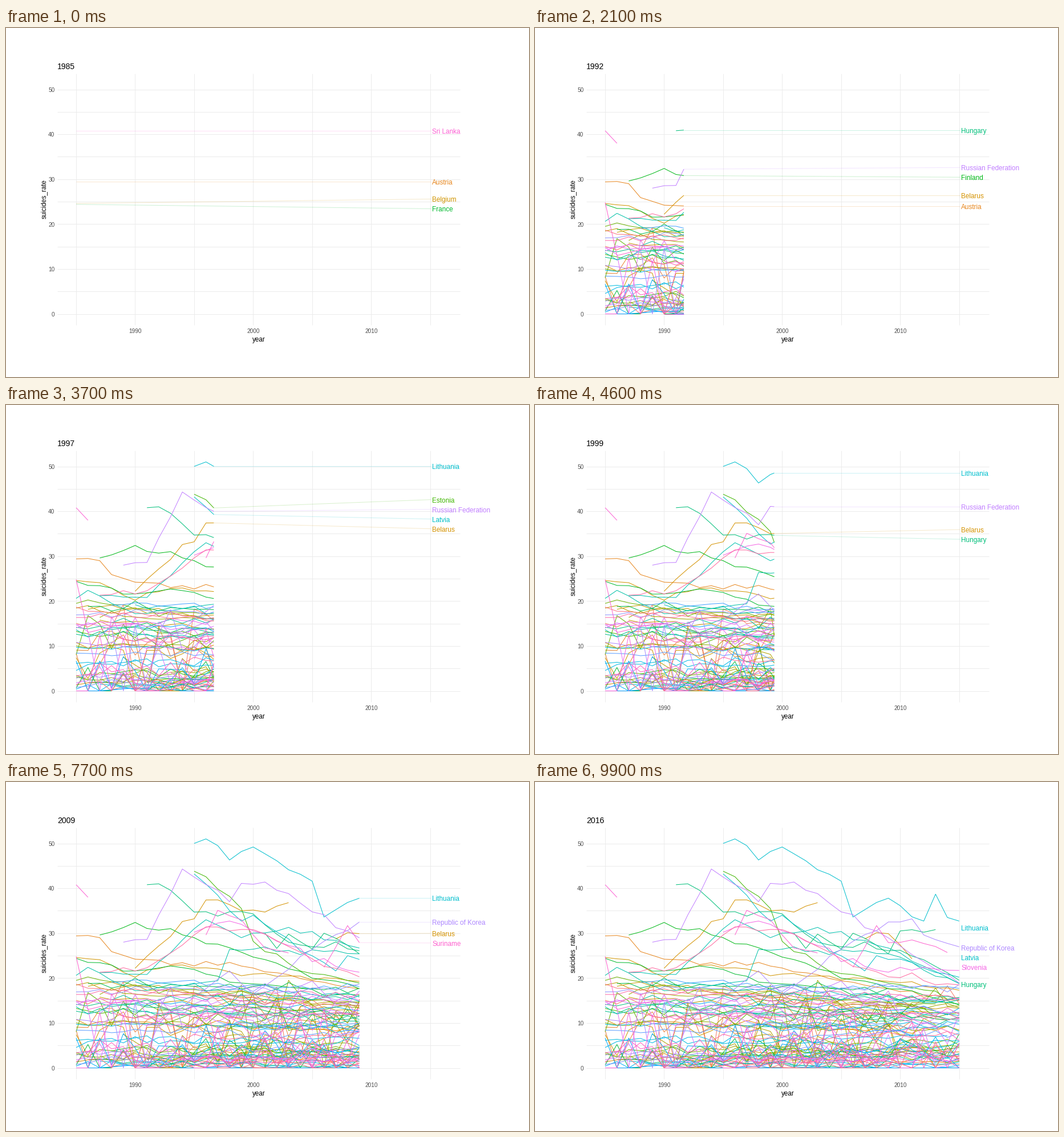
Recreate the animation shown at these times as a matplotlib script. Size 917 by 611 pixels, loop 10 s.

```python
import numpy as np
import matplotlib.pyplot as plt
from matplotlib.animation import FuncAnimation
from matplotlib.collections import LineCollection

W, H, DPI = 917, 611, 64
FRAMES, SPAN, COUNTRIES = 100, 31, 101
PT = 72 / DPI
GRID = "#ebebeb"
plt.rcParams["font.family"] = "Liberation Sans"

rng = np.random.default_rng(12)
series = []     # (hue index, first year counted from 1985, yearly rates)
names = {}      # hue index -> label


def px(year):
    return 123 + 20.69 * year


def py(rate):
    return 500.5 - 7.86 * rate


def hue_color(i):
    """Evenly spaced HCL hue with chroma 100 and luminance 65."""
    h = np.radians(15 + 360 * i / COUNTRIES)
    lum = 65
    u = 100 * np.cos(h) / (13 * lum) + 0.1978
    v = 100 * np.sin(h) / (13 * lum) + 0.4683
    y = ((lum + 16) / 116) ** 3
    x, z = 9 * y * u / (4 * v), (12 - 3 * u - 20 * v) * y / (4 * v)
    rgb = np.array([3.2406 * x - 1.5372 * y - 0.4986 * z,
                    -0.9689 * x + 1.8758 * y + 0.0415 * z,
                    0.0557 * x - 0.2040 * y + 1.0570 * z])
    rgb = np.clip(rgb, 0, 1)
    return tuple(np.where(rgb <= 0.0031308, 12.92 * rgb,
                          1.055 * rgb ** (1 / 2.4) - 0.055))


def trend(i, name, *keys):
    """Straight runs between (year, rate) keys, with a wobble off the keys."""
    names[i] = name
    ky, kr = np.array(keys, float).T
    years = np.arange(ky[0], ky[-1] + 1)
    rates = np.interp(years, ky, kr)
    rates += np.where(np.isin(years, ky), 0, rng.normal(0, 0.4, len(years)))
    series.append((i, int(ky[0]) - 1985, rates))


def drift(i):
    """A minor country: slow change of level; small ones jump and drop to zero."""
    start = 0 if rng.random() < 0.45 else int(rng.integers(1, 14))
    end = 30 if rng.random() < 0.75 else int(rng.integers(24, 31))
    n = end - start + 1
    small = rng.random() < 0.3
    level = 20 * rng.random() ** 1.35
    goal = 0.75 * level + 1.5 + rng.normal(0, 1.5)
    rates = np.linspace(level, goal, n) + rng.normal(0, 2.3 if small else 0.5, n)
    if small:
        rates *= rng.random(n) > 0.1
    series.append((i, start, np.maximum(rates, 0)))


trend(87, "Sri Lanka", (1985, 40.8), (1986, 38))
trend(6, "Austria", (1985, 29.4), (1987, 29), (1988, 25.9), (1993, 23), (1996, 23.7), (2015, 15))
trend(12, "Belgium", (1985, 24.6), (1987, 24.1), (1990, 20.2), (1993, 22.8), (2015, 17.3))
trend(33, "France", (1985, 24.4), (1990, 21.6), (1993, 22.7), (1999, 18.9), (2015, 14.2))
trend(46, "Japan", (1985, 20.6), (1986, 22.4), (1990, 17.2), (1997, 19.4), (1998, 26.4),
      (2009, 25.4), (2015, 18.8))
trend(32, "Finland", (1987, 29.6), (1990, 32.4), (1995, 29), (2004, 21.5), (2015, 14))
trend(95, "Ukraine", (1987, 21.3), (1991, 22.3), (1996, 31.4), (2000, 30.8), (2006, 22.6),
      (2015, 18.5))
trend(47, "Kazakhstan", (1987, 21.2), (1991, 20.8), (1996, 33), (1999, 29), (2003, 31.3),
      (2009, 26.7), (2015, 18.8))
trend(75, "Russian Federation", (1989, 28), (1991, 28.6), (1994, 44.3), (1998, 37),
      (1999, 41.1), (2001, 41.4), (2015, 18.9))
trend(11, "Belarus", (1990, 22.2), (1994, 32.6), (1995, 33.2), (1996, 37.4), (2001, 34.7),
      (2003, 36.8))
trend(11, "Belarus", (2007, 28.7), (2009, 29.9), (2011, 24.3))
trend(40, "Hungary", (1991, 40.8), (1992, 41), (1994, 37.2), (1995, 34.7), (2000, 34.3),
      (2003, 28), (2010, 26.2), (2015, 19.5), (2016, 18.6))
trend(52, "Lithuania", (1995, 50), (1996, 51), (1998, 46.3), (2000, 49.2), (2005, 41.6),
      (2006, 33.6), (2009, 37.8), (2012, 32.7), (2013, 38.7), (2014, 33.5), (2016, 31.2))
trend(30, "Estonia", (1995, 43.8), (1999, 35.5), (2000, 28.2), (2005, 21), (2015, 15.7))
trend(51, "Latvia", (1995, 43.2), (1999, 32.7), (2000, 34), (2007, 21.6), (2008, 25),
      (2015, 20.2), (2016, 24.4))
trend(84, "Slovenia", (1995, 30.2), (1998, 32.7), (2007, 22.6), (2015, 21.7), (2016, 22.8))
trend(88, "Suriname", (1985, 24.8), (1986, 13), (1990, 15))
trend(88, "Suriname", (1996, 29.6), (1997, 35.1), (1999, 33), (2001, 26.7), (2003, 25.6))
trend(88, "Suriname", (2006, 22.4), (2008, 31.7), (2009, 27.9), (2011, 28.5), (2014, 25.7))
trend(39, "Guyana", (2001, 30), (2002, 26.6), (2003, 29.8), (2005, 26.5), (2006, 30),
      (2009, 25.4), (2010, 30.5), (2013, 30.8))
trend(73, "Republic of Korea", (1985, 10.8), (1992, 9.8), (1998, 21.6), (2000, 16.5),
      (2005, 26.4), (2009, 32.5), (2011, 33.2), (2012, 29.6), (2016, 26.6))
for i in range(COUNTRIES):
    if i not in names:
        drift(i)
series.sort(key=lambda s: s[0])

COLORS = [hue_color(i) for i in range(COUNTRIES)]


def leaders(year):
    """The five highest named countries in one year."""
    rates = {i: v[year - s] for i, s, v in series
             if i in names and 0 <= year - s < len(v)}
    return dict(sorted(rates.items(), key=lambda r: -r[1])[:5])


TOP = [leaders(y) for y in range(SPAN + 1)]
KEYS = np.round(np.arange(SPAN + 1) * (FRAMES - 1) / SPAN)


def spread(ys, gap=17):
    """Push sorted label heights apart until none overlap."""
    ys = np.array(ys, float)
    for _ in range(150):
        for k in range(len(ys) - 1):
            push = (gap - (ys[k + 1] - ys[k])) / 2
            if push > 0:
                ys[k] -= push
                ys[k + 1] += push
    return ys


def current(now):
    """Named countries leading both before and after this moment."""
    year = min(int(now), SPAN - 1)
    f = now - year
    a, b = TOP[year], TOP[year + 1]
    both = [(i, a[i] * (1 - f) + b[i] * f) for i in a if i in b]
    return sorted(both, key=lambda r: -r[1])


fig = plt.figure(figsize=(W / DPI, H / DPI), dpi=DPI, facecolor="white")
ax = fig.add_axes([0, 0, 1, 1])
ax.set(xlim=(0, W), ylim=(H, 0))
ax.axis("off")


def text(x, y, s, size, color="black", **kw):
    return ax.text(x, y, s, fontsize=size * PT, color=color, va="baseline", **kw)


grid = [[(90, py(r)), (796, py(r))] for r in range(0, 51, 5)]
grid += [[(px(y), 80), (px(y), 520)] for y in range(0, 31, 5)]
ax.add_collection(LineCollection(grid, colors=GRID, linewidths=PT))
for r in range(0, 51, 10):
    text(85.5, py(r) + 4.3, str(r), 10, "#4d4d4d", ha="right")
for y in (5, 15, 25):
    text(px(y), 534, str(1985 + y), 10, "#4d4d4d", ha="center")
text(443.3, 549, "year", 11.6, ha="center")
text(70, 300, "suicides_rate", 11.6, ha="center", rotation=90, rotation_mode="anchor")
title = text(90, 71.5, "", 14)

leads = LineCollection([], linewidths=PT, alpha=0.2)
paths = LineCollection([], linewidths=PT)
ax.add_collection(leads)
ax.add_collection(paths)
labels = [text(747, 0, "", 11.75) for _ in range(5)]


def update(frame):
    now = float(np.interp(frame, KEYS, np.arange(SPAN + 1)))
    title.set_text(str(round(1985 + SPAN * frame / (FRAMES - 1))))

    tip = min(now, 30)
    segs, cols = [], []
    for i, start, rates in series:
        if tip <= start:
            continue
        years = start + np.arange(len(rates))
        end = min(tip, years[-1])
        xs = np.append(years[years < end], end)
        segs.append(np.column_stack([px(xs), py(np.interp(xs, years, rates))]))
        cols.append(COLORS[i])
    paths.set_segments(segs)
    paths.set_color(cols)

    shown = current(now)
    heights = spread([py(r) for _, r in shown])
    for label in labels:
        label.set_visible(False)
    for label, (i, _), y in zip(labels, shown, heights):
        label.set(visible=True, text=names[i], color=COLORS[i], y=y + 5)
    inside = now < 30
    leads.set_segments([[(px(now), py(r)), (745, y)]
                        for (_, r), y in zip(shown, heights)] if inside else [])
    leads.set_color([COLORS[i] for i, _ in shown] if inside else [])
    return [title, leads, paths, *labels]


anim = FuncAnimation(fig, update, frames=FRAMES, interval=100, repeat=True,
                     repeat_delay=0, blit=False)
plt.show()
```
